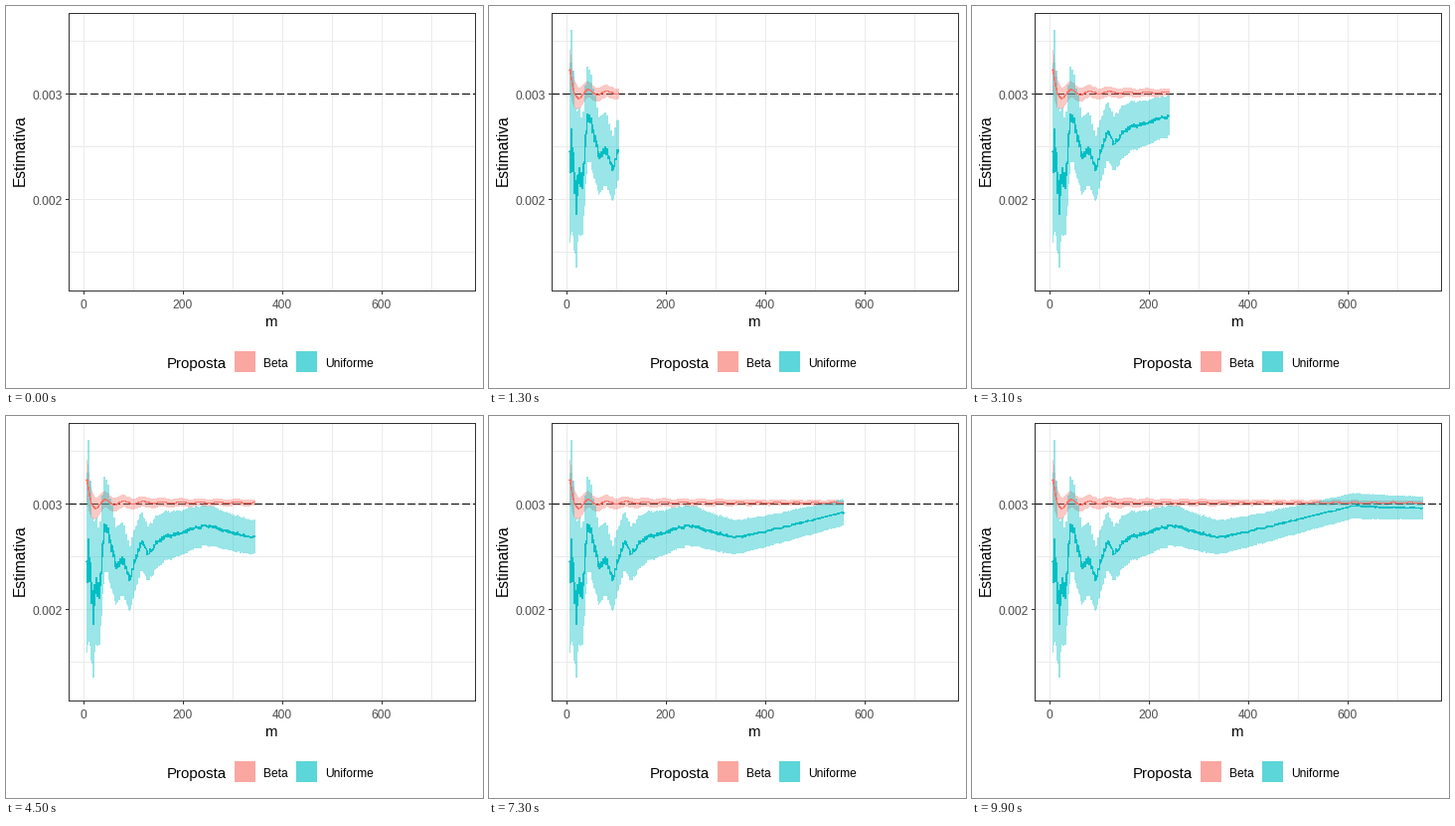
Write a matplotlib script that moves like this. It is 480 px wide and 384 px high and loops after 10 s.

```python
import numpy as np
import matplotlib.pyplot as plt
from matplotlib.animation import FuncAnimation
from matplotlib.patches import Rectangle

W, H, DPI = 480, 384, 72
FRAMES, INTERVAL = 100, 100
FIRST, LAST = 6, 750
LEFT, RIGHT, TOP, BOTTOM = 63, 472, 7, 286
RED, TEAL = "#F8766D", "#00BFC4"
INK, GRID, LABEL = "#333333", "#EBEBEB", "#4D4D4D"

plt.rcParams["font.family"] = "Liberation Sans"

m = np.arange(FIRST, LAST + 1)


def px(v):
    return 78 + 0.5005 * np.asarray(v)


def py(v):
    """Pixel row of an estimate given in thousandths."""
    return 88 + 106 * (3 - np.asarray(v))


def wobble(rough, cap, seed):
    """Autocorrelated noise that fades as 1/m."""
    step = np.random.default_rng(seed).normal(size=m.size)
    noise = np.zeros(m.size)
    for i in range(1, m.size):
        noise[i] = 0.75 * noise[i - 1] + 0.66 * step[i]
    return noise * np.minimum(cap, rough / m)


def beta_curve():
    mean = 3.013 + 1.3 / m * np.cos(2 * np.pi * (m - 5) / 38)
    return mean + wobble(0.25, 0.008, 4), 0.47 / np.sqrt(m)


def uniform_curve():
    # Turning points of the slow drift; the early zigzag dies out with m
    drift = [(6, 2.45), (10, 2.48), (19, 1.95), (22, 2.22), (31, 2.2), (40, 2.77),
             (48, 2.76), (64, 2.4), (76, 2.47), (92, 2.29), (115, 2.65), (129, 2.52),
             (150, 2.66), (241, 2.8), (338, 2.68), (400, 2.74), (607, 2.98),
             (750, 2.96)]
    zigzag = 2 / (m + 2) * np.sin(np.pi / 2 * m)
    mean = np.interp(m, *zip(*drift)) + zigzag + wobble(1.6, 0.02, 11)
    return mean, 2.84 / np.sqrt(m + 5) * (1 + 1.3 * zigzag)


class Band:
    def __init__(self, ax, mean, half, color, z):
        self.curves = mean, mean - half, mean + half
        self.area, = ax.fill([0, 0], [0, 0], color=color, alpha=0.4, lw=0,
                             aa=False, zorder=z)
        self.line, = ax.plot([], [], color=color, lw=1, aa=False, snap=True,
                             zorder=z + 2)

    def reveal(self, end):
        t = np.append(m[m < end], end)
        x = px(t)
        mid, low, high = (py(np.interp(t, m, c)) for c in self.curves)
        self.line.set_data(x, mid)
        outline = np.column_stack([np.r_[x, x[::-1]], np.r_[low, high[::-1]]])
        self.area.set_xy(outline + 0.5)
        for part in (self.line, self.area):
            part.set_visible(end > FIRST)


fig = plt.figure(figsize=(W / DPI, H / DPI), dpi=DPI, facecolor="white")
ax = fig.add_axes([0, 0, 1, 1])
ax.set(xlim=(0, W), ylim=(H, 0))
ax.axis("off")


def segment(x, y, color, **kw):
    ax.plot(x, y, color=color, lw=1, aa=False, solid_capstyle="butt", **kw)


def label(x, y, s, size=12, color="black", ha="left", **kw):
    kw.setdefault("va", "baseline")
    ax.text(x, y, s, size=size, color=color, ha=ha, **kw)


# Grid, ticks and axis text; whole numbers snap to pixel rows and columns
for v in range(0, 800, 100):
    x = np.floor(px(v))
    segment([x, x], [TOP, BOTTOM], GRID, zorder=1)
    if v % 200 == 0:
        segment([x, x], [BOTTOM, BOTTOM + 3], INK, zorder=8)
        label(x - 0.5, 304, str(v), color=LABEL, ha="center")
for v in (1.5, 2, 2.5, 3, 3.5):
    y = float(py(v))
    segment([LEFT, RIGHT], [y, y], GRID, zorder=1)
    if v in (2, 3):
        segment([LEFT - 3, LEFT], [y, y], INK, zorder=8)
        label(56.5, y + 6, f"{v / 1000:.3f}", color=LABEL, ha="right")

segment([LEFT, RIGHT], [py(3)] * 2, "black", dashes=(7, 3),
        dash_capstyle="butt", zorder=2)
ax.add_patch(Rectangle((LEFT, TOP), RIGHT - LEFT, BOTTOM - TOP, fill=False,
                       ec=INK, lw=1, aa=False, zorder=9))

label(266, 322, "m", 15, ha="center")
label(22, 145, "Estimativa", 15.5, ha="right", va="center", rotation=90)

# Legend
label(162, 364, "Proposta", 15)
for x, color, name in ((230, RED, "Beta"), (292, TEAL, "Uniforme")):
    ax.add_patch(Rectangle((x, 347), 21, 21, fc=color, alpha=0.64, lw=0))
    label(x + 29.5, 363, name)

bands = [Band(ax, *beta_curve(), RED, 3), Band(ax, *uniform_curve(), TEAL, 4)]


def update(i):
    end = FIRST + (LAST - FIRST) * i / (FRAMES - 1)
    for band in bands:
        band.reveal(end)
    return []


anim = FuncAnimation(fig, update, frames=FRAMES, interval=INTERVAL,
                     repeat=True, repeat_delay=0, blit=False)
plt.show()
```
